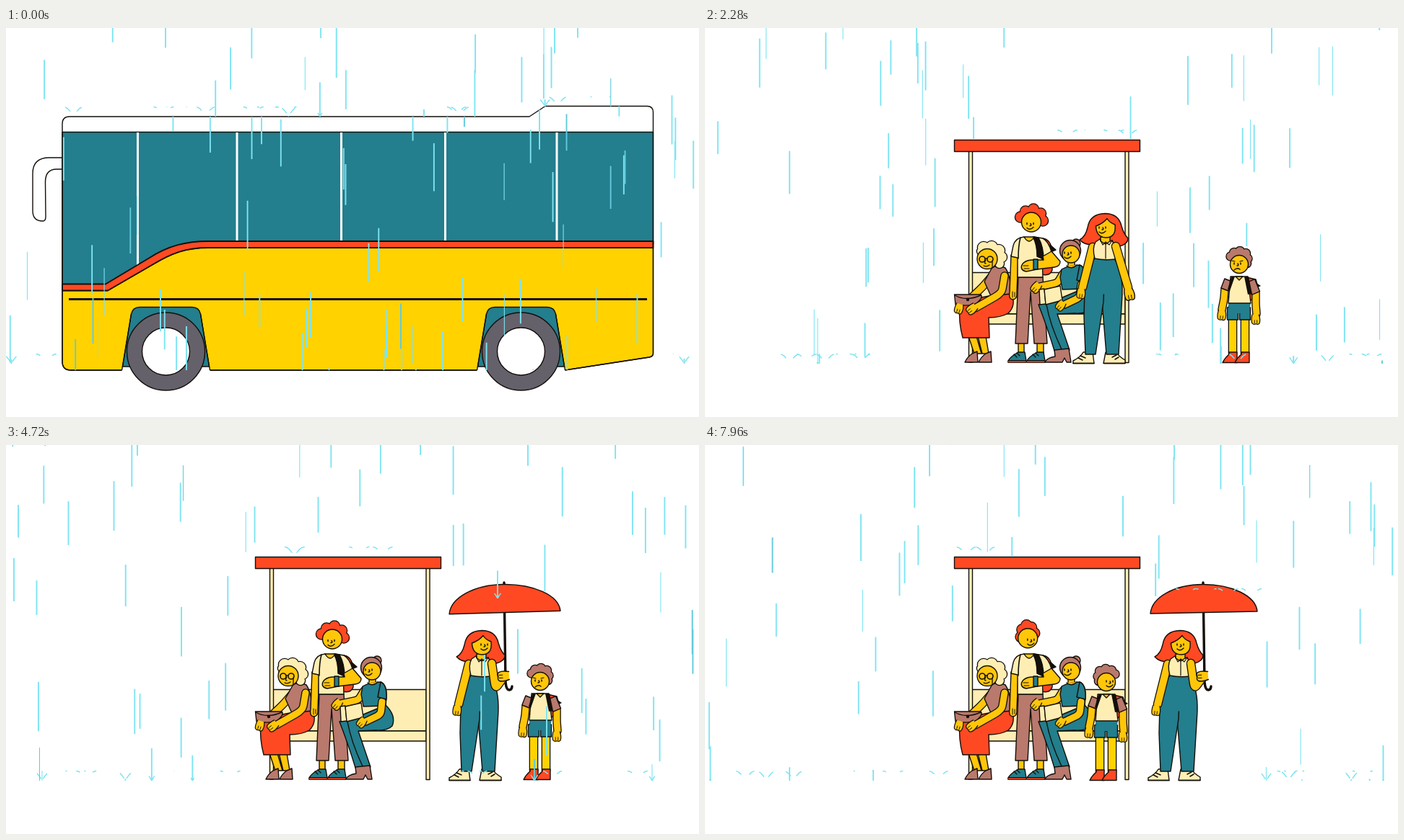
Animation of 960x540 px, one loop 8 s. Source, as an HTML page with a canvas:

```html
<!DOCTYPE html>
<html lang="en">
<head>
<meta charset="utf-8">
<title>Rainy bus stop</title>
<style>
html, body { margin: 0; width: 100%; height: 100%; overflow: hidden; background: #fff; }
canvas { display: block; }
</style>
</head>
<body>
<canvas id="stage" width="960" height="540"></canvas>
<script>
const ctx = document.getElementById('stage').getContext('2d');
const LOOP = 8000;
const TEAL = '#237e8d', YELLOW = '#ffd200', SKIN = '#ffc60a', ORANGE = '#ff4923',
  CREAM = '#ffeeb4', MAUVE = '#b9796d', GRAY = '#65616b', INK = '#140f0a',
  RAIN = '#7de4f2', DARK_RAIN = '#62cadb';

// ---------- helpers ----------
const lerp = (a, b, k) => a + (b - a) * k;
const clamp01 = v => Math.max(0, Math.min(1, v));
const smooth = v => { v = clamp01(v); return v * v * (3 - 2 * v); };
const rnd = n => { const v = Math.sin(n * 127.13 + 3.7) * 43758.5453; return v - Math.floor(v); };

// Smooth interpolation through [time, value] keys.
function key(t, ...keys) {
  if (t <= keys[0][0]) return keys[0][1];
  for (let i = 1; i < keys.length; i++) {
    const [a, u] = keys[i - 1], [b, v] = keys[i];
    if (t < b) return lerp(u, v, smooth((t - a) / (b - a)));
  }
  return keys[keys.length - 1][1];
}

function paint(path, fill, width = 1.4) {
  if (fill) { ctx.fillStyle = fill; ctx.fill(path); }
  if (width) { ctx.strokeStyle = INK; ctx.lineWidth = width; ctx.stroke(path); }
}
const cache = {};
const shape = (d, fill, width) => paint(cache[d] || (cache[d] = new Path2D(d)), fill, width);

function disc(x, y, r, fill, width) {
  const p = new Path2D();
  p.arc(x, y, r, 0, 7);
  paint(p, fill, width);
}

function poly(points, fill, width) {
  const p = new Path2D();
  points.forEach(([x, y]) => p.lineTo(x, y));
  p.closePath();
  paint(p, fill, width);
}

// Circles merged under one outline.
function blobs(list, x, y, flip, fill) {
  const p = new Path2D();
  for (const [dx, dy, r] of list) {
    p.moveTo(x + dx * flip + r, y + dy);
    p.arc(x + dx * flip, y + dy, r, 0, 7);
  }
  paint(p, null, 2.6);
  paint(p, fill, 0);
}

// Rounded tube along three points.
function limb(points, width, fill) {
  const [a, b, c] = points;
  const p = new Path2D();
  p.moveTo(...a);
  p.lineTo(lerp(a[0], b[0], .75), lerp(a[1], b[1], .75));
  p.quadraticCurveTo(...b, lerp(b[0], c[0], .25), lerp(b[1], c[1], .25));
  p.lineTo(...c);
  ctx.lineCap = ctx.lineJoin = 'round';
  for (const [w, color] of [[width + 2.6, INK], [width, fill]]) {
    ctx.lineWidth = w;
    ctx.strokeStyle = color;
    ctx.stroke(p);
  }
}

// Straight cuff with square ends.
function cuff(a, b, width, fill) {
  const d = Math.hypot(b[0] - a[0], b[1] - a[1]) || 1;
  const nx = (a[1] - b[1]) / d * width / 2, ny = (b[0] - a[0]) / d * width / 2;
  poly([[a[0] + nx, a[1] + ny], [b[0] + nx, b[1] + ny],
    [b[0] - nx, b[1] - ny], [a[0] - nx, a[1] - ny]], fill);
}

function hand(x, y, angle, size = 1) {
  ctx.save();
  ctx.translate(x, y);
  ctx.rotate(angle);
  ctx.scale(size, size);
  shape('M-6,-7Q-8,2 -6,7Q-3,10 0,8Q4,10 6,7Q8,1 5,-7', SKIN);
  shape('M-2,2V7M2,2V7', null, 1);
  ctx.restore();
}

function face(x, y, mood) {
  ctx.save();
  ctx.translate(x, y);
  shape('M-4,-3V-1M5,-3V-1M1,-2Q3,1 0,1', null, 1.5);
  shape(mood > 0 ? 'M-4,4Q0,8 5,3' : 'M-4,7Q0,3 4,6', null, 1.4);
  if (mood < 0) shape('M-7,-6L-3,-5M4,-5L8,-6', null, 1.2);
  ctx.restore();
}

// ---------- bus ----------
const busX = t => -546 * (Math.max(0, t) / 1520) ** 2;
const busBody = new Path2D('M78,133Q78,123 88,123H725L747,108.5H888Q896.5,108.5 896.5,117V452' +
  'Q896.5,456 891,457L774,475H90Q78,475 78,463Z');

function wheel(x) {
  ctx.save();
  ctx.translate(x, 0);
  shape('M-61,476L-48,397Q-46,387.5 -36,387.5H36Q46,387.5 48,397L61,476Z', '#fff', 0);
  shape('M-60,470L-48,397Q-46,387.5 -36,387.5H36Q46,387.5 48,397L60,470Z', TEAL);
  shape('M-61,475L-48,397M61,475L48,397');
  ctx.restore();
  disc(x, 449, 54, GRAY);
  disc(x, 449, 33, '#fff');
}

function bus(x) {
  if (x < -900) return;
  ctx.save();
  ctx.translate(x, 0);
  shape('M78,180H60Q37,180 37,202V254Q37,268 51,268Q55,268 55,262L54.5,214Q54.5,196 70,196H78Z', '#fff');
  paint(busBody, '#fff', 0);
  shape('M78,144.5H896.5V300H280L140,362H78Z', TEAL);
  ctx.strokeStyle = '#fff';
  ctx.lineWidth = 3;
  ctx.lineCap = 'butt';
  for (const [lx, end] of [[182.5, 329], [320, 296], [464.5, 296], [608.5, 296], [763, 296]]) {
    ctx.beginPath();
    ctx.moveTo(lx, 145);
    ctx.lineTo(lx, end);
    ctx.stroke();
  }
  shape('M78,364.5H141L203,328.5C230,312 250,305 280,305H896.5V452Q896.5,456 891,457L774,475H90Q78,475 78,463Z', YELLOW);
  shape('M78,355.5H138L198,319.5C225,302 250,296 280,296H896.5V305H280C250,305 230,312 203,328.5L141,364.5H78Z', ORANGE, 1.9);
  paint(busBody);
  shape('M87,376.5H888', null, 2.8);
  wheel(221.5);
  wheel(713.5);
  ctx.restore();
}

// ---------- shelter and its people ----------
function shelter() {
  shape('M366,339.5H582V397H366Z', CREAM);
  shape('M366,397H582V411H366Z', CREAM);
  shape('M365.5,171H370.5V464H365.5Z', CREAM);
  shape('M582,171H587V464.5H582Z', CREAM);
  shape('M345.5,155.5H602.5V171.5H345.5Z', ORANGE);
}

function granny() {
  shape('M365,428H376L383,452H373ZM378,428H389L393,452H384Z', SKIN);
  for (const x of [0, 19]) {
    shape(`M${360 + x},464Q${363 + x},457 ${370 + x},452L${377 + x},449L${378 + x},464Z`, MAUVE);
  }
  shape('M383,374L424,366Q432,385 420,396Q410,402 393,402L394,430H357Q351,408 353,386Z', ORANGE);
  limb([[396, 346], [384, 360], [366, 377]], 9, SKIN);
  shape('M398,332Q408,329 416,333Q424,345 424,369L396,372L387,352Z', MAUVE);
  shape('M345.5,370H382Q386,374 376,382Q368,387 347,384Z', MAUVE);
  shape('M346,371Q362,380 382,371');
  disc(364, 377, 2.2, INK, 0);
  limb([[415, 344], [411, 368], [374, 389]], 9, SKIN);
  hand(352, 389, .3, .85);
  hand(370, 390, .9, .9);
  blobs([[-6, -15, 8], [5, -16, 8], [15, -11, 8], [19, -2, 7], [16, 7, 6], [-10, -10, 5]], 392, 320, 1, CREAM);
  disc(391, 320.5, 14, SKIN);
  disc(384, 321, 4, null, 1.6);
  disc(395, 321, 4, null, 1.6);
  shape('M388,320H391M389,322Q386,327 389,327M386,330Q390,332 394,329M398,323V333', null, 1.3);
}

function man(t) {
  const turn = key(t, [1550, 1], [1950, 0], [6600, 0], [7000, .8]);
  shape('M466,292Q480,292 481,312V336Q478,345 466,342Z', ORANGE);
  shape('M478,301L486,308L481,310Z', INK);
  shape('M434,436H442V455H434ZM460,436H469V455H460Z', SKIN);
  shape('M434,346L430,438H447L451,366L456,438H474L468,346Z', MAUVE);
  for (const x of [0, 26]) {
    shape(`M${420 + x},462Q${423 + x},456 ${434 + x},450L${443 + x},450L${445 + x},462Z`, TEAL);
    shape(`M${420 + x},462H${445 + x}V464.5H${420 + x}Z`, ORANGE, .9);
    shape(`M${428 + x},453L${432 + x},457M${432 + x},451L${436 + x},455`, null, 1.2);
  }
  shape('M424,315L434,317L432,366Q433,377 426,377Q420,376 422,366Z', SKIN);
  shape('M426,366V374M429,367V373', null, 1);
  shape('M442,290Q430,291 427,302L424,317L433,319V346H468L467,318L480,311Q476,296 468,292L456,290Q449,297 442,290Z', CREAM);
  shape('M437,291Q434,302 434,320', null, 1.6);
  shape('M454,290Q460,300 460,317L469,321Q469,304 462,291Z', INK);
  shape('M468,317L480,310L492,324Q492,331 484,332L460,335L445,338Q436,336 439,329Q442,323 452,322L469,322Z', SKIN);
  shape('M455,321H461V335H455Z', TEAL);
  shape('M441,330H448M442,334H449', null, 1);
  shape('M442,290Q449,302 456,290Z', SKIN);
  const x = lerp(452, 446, turn), y = lerp(269.5, 268, turn);
  blobs([[-15, -7, 7], [-8, -15, 7], [3, -18, 7], [13, -12, 7], [16, -2, 7]], x, y, lerp(1, -1, turn), ORANGE);
  disc(x, y, 13.5, SKIN);
  face(x + lerp(-2, 5, turn), y + 4, 1);
}

function sitter() {
  shape('M526,361Q541,376 535,390Q528,397 512,396L488,397L505,447L484,448Q475,418 462,384L488,377Z', TEAL);
  shape('M473,384Q478,412 494,446', null, 1.4);
  shape('M484,447L504,445L507,464H501L498,458L495,464H471Q473,458 485,456Z', MAUVE);
  limb([[496, 341], [488, 354], [464, 359]], 9, SKIN);
  hand(459, 360, .7, .9);
  shape('M463,363L470,362L472,383L464,384Z', CREAM);
  shape('M470,363L492,358L495,378L472,384Z', CREAM);
  shape('M503,324H512V334H503Z', SKIN);
  shape('M494,335Q505,329 519,329Q528,333 527,350L526,362L495,363L492,346Z', TEAL);
  limb([[521, 356], [519, 374], [498, 384]], 9, SKIN);
  shape('M515,350L527,353Q528,332 519,329Z', TEAL);
  hand(493, 385, .7, .85);
  shape('M501,330Q508,336 515,329', SKIN);
  disc(514, 299, 6, MAUVE);
  disc(506, 309, 14.5, MAUVE);
  disc(507, 314, 12, SKIN);
  face(502, 314, 1);
}

// ---------- woman with umbrella ----------
function umbrella(t) {
  const grow = key(t, [4260, 0], [4420, 1]);
  if (!grow) return;
  const open = key(t, [4400, .12], [4640, 1.06], [4720, 1.04], [4960, 1]);
  ctx.save();
  ctx.translate(587, 321);
  ctx.scale(grow, grow);
  shape('M-1,-130L1,8Q2,20 7,19Q10,18 10,14', null, 3.4);
  ctx.translate(0, -88);
  ctx.rotate(key(t, [4640, -.012], [5000, 0]));
  ctx.scale(open, lerp(1.6, 1, clamp01(open)));
  shape('M-74,1C-72,-22 -40,-39.5 -1,-39.5C38,-39.5 72,-24 74,-2Z', ORANGE);
  ctx.restore();
}

function leg(swing, thigh, foot, laces) {
  ctx.save();
  ctx.translate(553, 330);
  ctx.rotate(swing);
  ctx.translate(-553, -330);
  shape(foot, CREAM);
  shape(laces, null, 1.5);
  shape(thigh, TEAL);
  ctx.restore();
}

function woman(t) {
  const step = smooth((t - 3880) / 640);
  const swing = Math.sin(step * Math.PI * 2) * .24;
  const raise = key(t, [4160, 0], [4420, 1]);
  const look = key(t, [2500, -4], [3700, -1], [4000, 4], [4800, 4], [5500, 1], [7000, 0]);
  ctx.save();
  ctx.translate(104 * step, -Math.abs(swing) * 10);
  umbrella(t);
  const flow = Math.sin(clamp01((t - 4000) / 900) * Math.PI) * 4;
  ctx.save();
  ctx.translate(flow * .5, 0);
  shape('M554,257.5Q533,258 530,277Q527,290 519,294Q528,304 546,299L574,303Q586,300 586,292Q580,286 577,275Q573,257.5 554,257.5Z', ORANGE);
  ctx.restore();
  leg(-swing, 'M554,320L567,320Q579,338 578,370L573,453H556L550,380Z',
    'M552,465.5L555,450H570Q573,456 582,461V465.5Z', 'M553,465.5H582M564,457L570,454M568,460L573,457');
  leg(swing, 'M554,320L540,320Q527,335 526,362L525,400L527,453H541L552,380Z',
    'M510,465.5V462Q520,457 524,450H537L539,465.5Z', 'M510,465.5H539M520,455L527,458M517,458L523,461');
  shape('M539,322H567V358L552,370L541,358Z', TEAL, 0);
  limb([[537, 304], [530, 332], [523, 360]], 10, SKIN);
  hand(521, 368, .12, .85);
  shape('M541,297Q536,306 540,320Q553,323 568,321Q571,306 564,295L555,298L547,293Z', CREAM);
  const mid = [lerp(577, 574, raise), lerp(330, 338, raise)];
  const end = [lerp(586, 585, raise), lerp(360, 323, raise)];
  limb([[569, 303], mid, end], 10, SKIN);
  hand(end[0] + lerp(2, 1, raise), end[1] + lerp(9, -2, raise), lerp(-.2, 1.5, raise), 1);
  shape('M548,290H561V296L555,300L548,296Z', SKIN);
  shape('M547,293L551,301L555,297L560,301L564,295M555,298V320', null, 1.2);
  shape('M541.5,275Q552,271 557,264.5Q560,270 568,273Q570,291 555,291Q542,290 541.5,275Z', SKIN);
  face(554 + look, 279, 1);
  ctx.restore();
}

// ---------- boy ----------
// head, torso corners, left sleeve/elbow/hand, right sleeve/elbow/hand, left leg, right leg
const STAND = [740, 328, 728, 345, 752, 345, 756, 382, 725, 382,
  725, 350, 720, 363, 719, 376, 716, 391, 756, 351, 763, 368, 763, 384, 764, 397,
  731, 388, 731, 425, 731, 452, 748, 388, 748, 425, 748, 452];
const CROUCH = [726, 346, 721, 363, 747, 362, 750, 398, 723, 403,
  723, 368, 701, 371, 692, 376, 678, 390, 747, 367, 769, 371, 776, 374, 794, 383,
  730, 406, 708, 439, 729, 456, 744, 404, 736, 442, 751, 456];

function boy(t) {
  const bend = key(t, [5650, 0], [5930, 1], [6040, 1], [6400, 0]);
  const hop = Math.sin(clamp01((t - 6060) / 360) * Math.PI) * 22;
  const walk = smooth((t - 6450) / 1000);
  const swing = Math.sin(walk * Math.PI * 6) * smooth(Math.min(walk, 1 - walk) * 8);
  const turn = key(t, [7350, 0], [7700, 1]);
  const happy = t > 5100 ? 1 : -1;
  const pt = i => [lerp(STAND[i * 2], CROUCH[i * 2], bend), lerp(STAND[i * 2 + 1], CROUCH[i * 2 + 1], bend)];
  const [head, tl, tr, br, bl, sl, sl2, el, hl, sr, sr2, er, hr, hipL, kneeL, footL, hipR, kneeR, footR] =
    Array.from({ length: 19 }, (_, i) => pt(i));
  footL[0] += swing * 12; kneeL[0] += swing * 6; footL[1] -= Math.max(0, swing) * 4;
  footR[0] -= swing * 12; kneeR[0] -= swing * 6; footR[1] -= Math.max(0, -swing) * 4;
  hl[0] -= swing * 7;
  hr[0] += swing * 7;

  ctx.save();
  ctx.translate(-184 * walk, walk - hop - Math.abs(swing) * 2);
  poly([[tr[0] - 2, tr[1] + 1], [tr[0] + 11, tr[1] + 4], [br[0] + 12, lerp(366, 394, bend)],
    [br[0] - 2, br[1] - 2]], ORANGE);
  poly([[tr[0] + 9, tr[1] + 7], [tr[0] + 18, tr[1] + 13], [tr[0] + 12, tr[1] + 16]], INK, 0);
  for (const [hip, knee, foot] of [[hipL, kneeL, footL], [hipR, kneeR, footR]]) {
    limb([hip, knee, foot], 10, YELLOW);
    ctx.save();
    ctx.translate(...foot);
    shape('M-14,12.5Q-11,6 -5,1L-5,-2H6V12.5Z', ORANGE);
    ctx.restore();
    cuff(hip, [lerp(hip[0], knee[0], .46), lerp(hip[1], knee[1], .46)], 15, TEAL);
  }
  poly([bl, br, [hipR[0] + 5, hipR[1] + 8], [hipL[0] - 5, hipL[1] + 8]], TEAL, 0);
  limb([sl2, el, hl], 9, SKIN);
  limb([sr2, er, hr], 9, SKIN);
  hand(hl[0] - bend * 4, hl[1] + 7 - bend * 3, lerp(.1, .8, bend), .85);
  hand(hr[0] - 1 + bend * 5, hr[1] + 7 - bend * 5, lerp(0, -1.1, bend), .85);
  cuff(sl, sl2, 11, MAUVE);
  cuff(sr, sr2, 12, MAUVE);
  poly([tl, tr, br, bl], CREAM);
  poly([[tl[0] + 1, tl[1]], [tl[0] + 6, tl[1]], [bl[0] + 2, bl[1] - 17], [bl[0] - 1, bl[1] - 19]], INK, 0);
  poly([[tr[0] - 5, tr[1]], [tr[0] + 1, tr[1]], [br[0] + 2, br[1] - 13], [br[0] - 4, br[1] - 12]], INK, 0);
  poly([[tl[0] + 7, tl[1]], [tr[0] - 7, tr[1]], [(tl[0] + tr[0]) / 2, tl[1] + 5]], SKIN);
  blobs([[-12, -11, 5.5], [-7, -16, 6], [1, -18, 6], [9, -15, 6], [12, -8, 5.5], [11, -1, 5]],
    head[0], head[1], lerp(1, -1, turn), MAUVE);
  disc(head[0], head[1], 12.5, SKIN);
  face(head[0] + lerp(-3, 4, turn), head[1] + 1, happy);
  ctx.restore();
}

// ---------- rain ----------
const CYCLE = 800, SPEED = 1.05, GROUND = 466;

function landing(x, time, r) {
  const bx = busX(time);
  if (x > 78 + bx && x < 897 + bx) return x - bx > 735 ? 109 : 123;
  if (x > 345 && x < 603) return 155;
  if (time > 4600) return x > 617 && x < 766 ? 213 : GROUND;
  return x > 728 && x < 752 && r < .5 ? 303 : GROUND;
}

function splash(x, y, age) {
  const head = 1 - (1 - clamp01(age * 1.5)) ** 2;
  const tail = clamp01(age * 1.15 - .12);
  const rise = s => y - 13.5 * (2 * s - s * s);
  const mid = (head + tail) / 2;
  ctx.strokeStyle = RAIN;
  ctx.lineWidth = 1.5;
  ctx.beginPath();
  for (const side of [-14, 14]) {
    ctx.moveTo(x + side * tail, rise(tail));
    ctx.lineTo(x + side * mid, rise(mid));
    ctx.lineTo(x + side * head, rise(head));
  }
  ctx.stroke();
}

function rain(t, count, seed, land, splashes) {
  ctx.lineCap = 'butt';
  for (let i = 0; i < count; i++) {
    const shifted = t + rnd(i + seed) * CYCLE;
    const cycle = Math.floor(shifted / CYCLE);
    const age = shifted - cycle * CYCLE;
    const n = seed + i * 11 + (cycle % 10) * 1777;
    const x = rnd(n) * 953, length = 45 + rnd(n + 1) * 25, r = rnd(n + 2);
    const floor = land(x, t - age + 150, r);
    const tip = age * SPEED, top = tip - length;
    if (top < floor) {
      ctx.strokeStyle = r > .9 ? DARK_RAIN : RAIN;
      ctx.lineWidth = rnd(n + 3) < .25 ? 1.1 : 1.9;
      ctx.beginPath();
      ctx.moveTo(x, top);
      ctx.lineTo(x, Math.min(tip, floor));
      ctx.stroke();
    }
    const after = (age - floor / SPEED) / 240;
    if (splashes && after > 0 && after < 1 && rnd(n + 4) < .55) splash(x, floor, after);
  }
}

function draw(t) {
  ctx.fillStyle = '#fff';
  ctx.fillRect(0, 0, 960, 540);
  ctx.lineCap = ctx.lineJoin = 'round';
  shelter();
  granny();
  man(t);
  sitter();
  woman(t);
  boy(t);
  const bx = busX(t);
  bus(bx);
  rain(t, 130, 40, landing, true);
  if (bx > -900) {
    ctx.save();
    ctx.translate(bx, 0);
    ctx.clip(busBody);
    ctx.translate(-bx, 0);
    rain(t, 125, 900, () => 475, false);
    ctx.restore();
  }
}

const start = performance.now();
function tick() {
  draw((performance.now() - start) % LOOP);
  requestAnimationFrame(tick);
}
tick();
</script>
</body>
</html>
```
